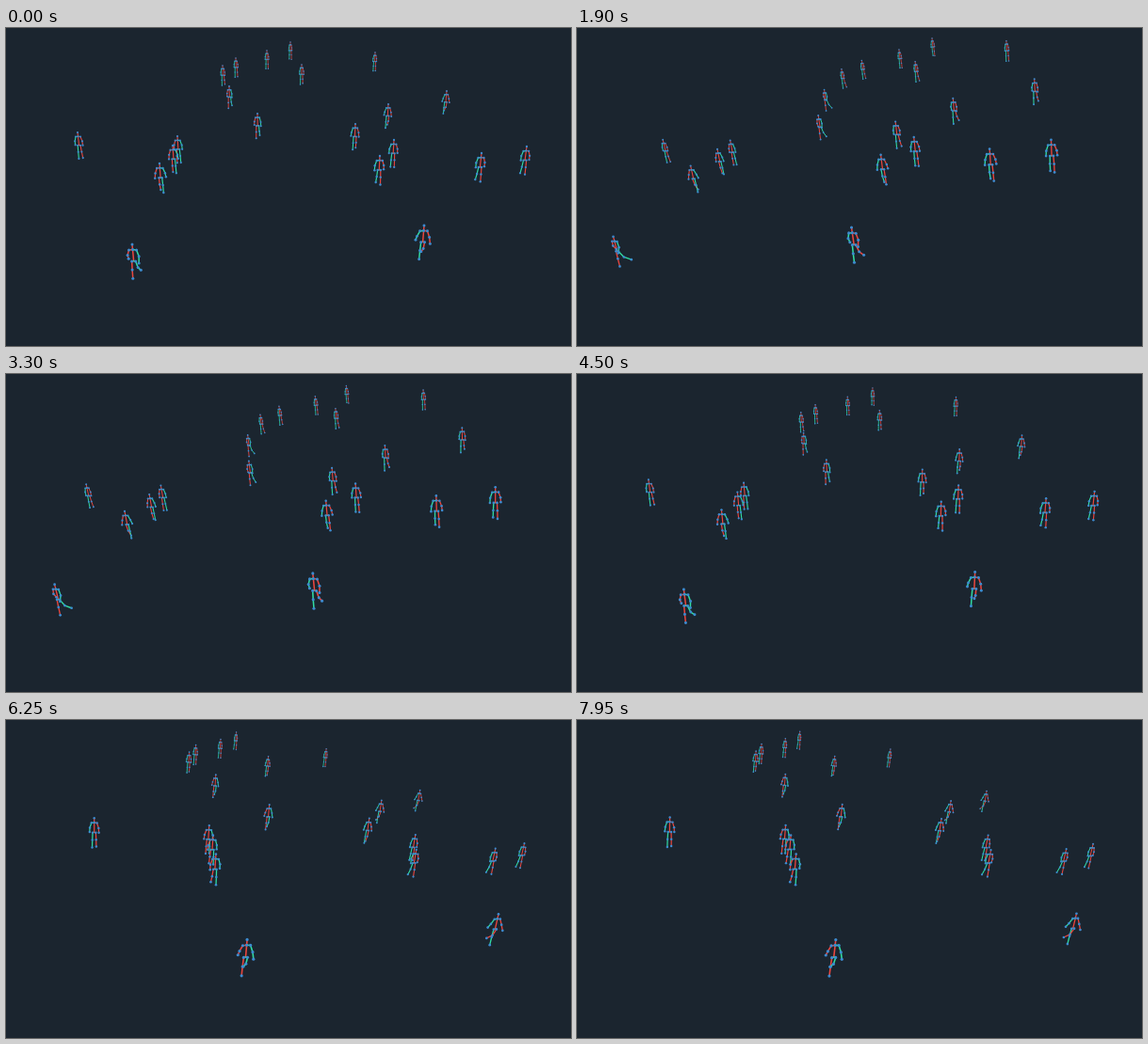
An HTML page with a canvas that plays this animation: 600x338 px, repeating every 8 s.

```html
<!DOCTYPE html>
<html lang="en">
<head>
<meta charset="utf-8">
<title>Walking skeletons</title>
<style>
  html, body { margin: 0; width: 100%; height: 100%; overflow: hidden; background: #1b252f; }
  canvas { display: block; width: 100vw; height: 100vh; }
</style>
</head>
<body>
<canvas id="stage" width="600" height="338"></canvas>
<script>
const ctx = document.getElementById('stage').getContext('2d');
const LOOP = 8000, TICK = 50, SWING = 9600;
const MAX_ANGLE = Math.PI / 6;
const FOCAL = 169 / Math.tan(Math.PI / 12);
const HEIGHT = 25.4, TILT = Math.atan(0.34);
const BACKGROUND = '#1b252f', RED = '#ea463f', GREEN = '#31dca2', BLUE = '#3c8bd0';

// Where each head stands, seen straight on, from far to near.
const heads = [
  [2, -154], [-23, -145], [92, -143], [-56, -137], [14, -130], [-70, -129], [-63, -107],
  [168, -102], [106, -88], [-33, -78], [71, -67], [-224, -58], [-118, -54], [112, -50],
  [-123, -44], [253, -43], [205, -36], [97, -33], [-137, -25], [144, 41], [-166, 61]
];

// The ground slopes: lower on the stage means nearer, levelling off at the front.
function groundDepth(x, y) {
  const drop = y + 91;
  return -2.86 * drop + 58 * (drop / 152) ** 4 - .02 * x;
}

function makePerson([x, y]) {
  const z = groundDepth(x, y);
  const scale = 1 - z / FOCAL, size = HEIGHT * scale;
  const spread = Math.min(1, .75 * scale);
  const stride = .1 + .3 * Math.sin((y - 15) / 24);
  const facesAway = Math.abs(x + 100) < 75 && y > -110;

  // A joint is given as right, up, away in body heights above the ground.
  const joint = (right, up, away) => {
    const drop = (1 - up) * size, back = away * size;
    return [
      x + right * size,
      y + drop * Math.cos(TILT) - back * Math.sin(TILT),
      z + drop * Math.sin(TILT) + back * Math.cos(TILT)
    ];
  };
  const head = joint(0, 1, 0), neck = joint(0, .85, 0), pelvis = joint(0, .52, 0);
  const chains = [{ color: RED, points: [pelvis, neck, head] }];
  for (const side of [-1, 1]) {
    const color = (side > 0) === facesAway ? GREEN : RED;
    const foot = Math.max(0, side * stride), hand = -side * stride * .35;
    chains.push({ color, points: [
      neck,
      joint(side * .1 * spread, .84, 0),
      joint(side * .16 * spread, .67, hand * .3),
      joint(side * .17 * spread, .52, hand)
    ] }, { color, points: [
      pelvis,
      joint(side * .05, .51, 0),
      joint(side * .06, .26, foot * .35),
      joint(side * .065, .15 * foot, foot)
    ] });
  }
  return { z, scale, head, chains };
}

const crowd = heads.map(makePerson);

// Turns the scene about the upright axis of the screen, then applies perspective.
function projector(angle, z0) {
  const s = Math.sin(angle), c = Math.cos(angle);
  return ([x, y, z]) => {
    const q = 1 + (z * c - z0 - x * s) / FOCAL;
    return [300 + (x * c + z * s) / q, 169 + y / q, q];
  };
}

function drawPerson({ z, scale, head, chains }, angle) {
  const project = projector(angle, z);
  const k = scale / project(head)[2];
  const flat = chains.map(({ color, points }) => ({ color, points: points.map(project) }));
  ctx.lineWidth = .95 * k;
  for (const { color, points } of flat) {
    ctx.strokeStyle = color;
    ctx.beginPath();
    for (const [x, y] of points) ctx.lineTo(x, y);
    ctx.stroke();
  }
  ctx.fillStyle = BLUE;
  for (const { points } of flat) {
    for (const [x, y] of points.slice(1)) {
      ctx.beginPath();
      ctx.arc(x, y, .95 * k, 0, 2 * Math.PI);
      ctx.fill();
    }
  }
}

// Constant-speed sweep: 0 to +1, back through 0 to -1, and so on.
function triangle(time) {
  const p = (time / SWING + .25) % 1;
  return 1 - Math.abs(4 * p - 2);
}

function draw(time) {
  ctx.fillStyle = BACKGROUND;
  ctx.fillRect(0, 0, 600, 338);
  ctx.lineCap = ctx.lineJoin = 'round';
  const angle = MAX_ANGLE * triangle(time);
  for (const person of crowd) drawPerson(person, angle);
}

const start = performance.now();
function frame() {
  const time = (performance.now() - start) % LOOP;
  draw(Math.floor(time / TICK) * TICK);
  requestAnimationFrame(frame);
}
frame();
</script>
</body>
</html>
```
